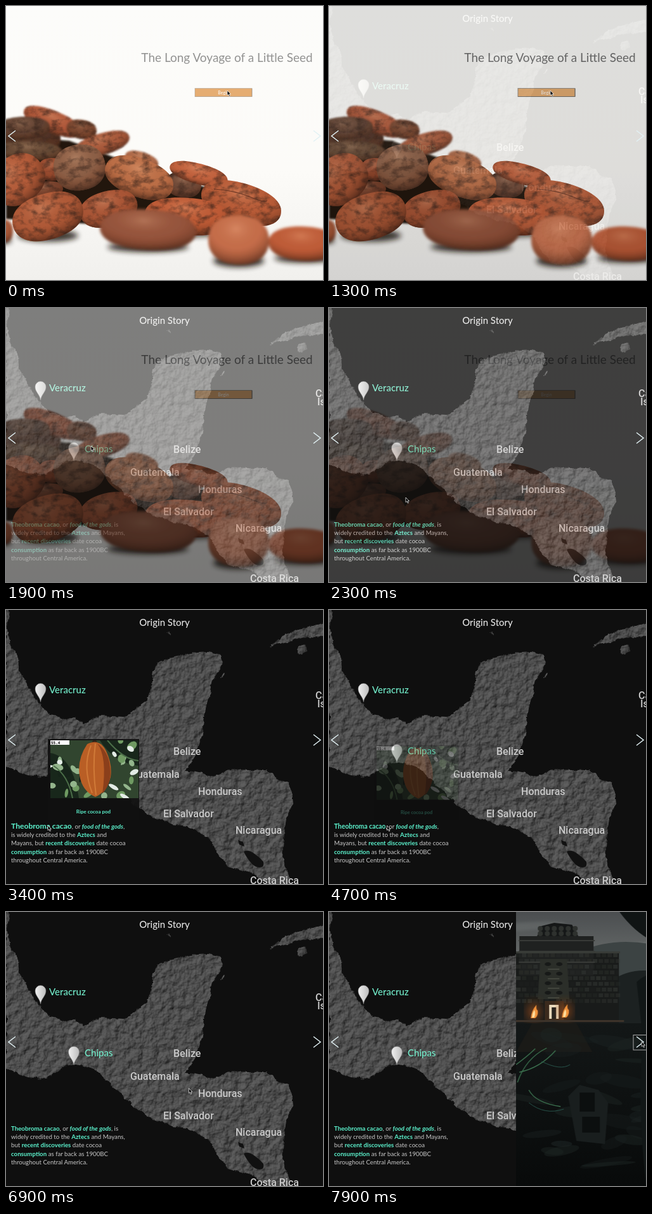
An HTML page for the animation above (8000 ms loop, 500x431 px).

```html
<!DOCTYPE html>
<html lang="en">
<head>
<meta charset="utf-8">
<title>Cacao story</title>
<style>
html, body { margin: 0; width: 100%; height: 100%; overflow: hidden; background: #0f0f0f; }
main { position: fixed; inset: 0; overflow: clip; contain: strict; }
main > svg { position: absolute; inset: 0; width: 100%; height: 100%; overflow: hidden; will-change: opacity; }
text { font-family: Lato, "Open Sans", sans-serif; white-space: pre; }
.land text { font: 500 16px Roboto, Arial, sans-serif; fill: #cacaca; }
.place { font-size: 15px; font-weight: 500; fill: #72ecca; }
.note { font-size: 9.7px; fill: #c9c9c9; }
.note .b { font-weight: 700; fill: #5cf2cd; }
.cap { font-size: 8px; font-weight: 700; fill: #5cf2cd; text-anchor: middle; }
</style>
</head>
<body>
<main id="stage"></main>
<script>
const LOOP = 8000, STEP = 100;
const $ = id => document.getElementById(id);
const clamp = v => Math.max(0, Math.min(1, v));
const ramp = (t, a, b) => clamp((t - a) / (b - a));
const smooth = p => p * p * (3 - 2 * p);
const easeInOut = p => p < .5 ? 4 * p ** 3 : 1 - 4 * (1 - p) ** 3;
const times = (n, f) => Array.from({ length: n }, (_, i) => f(i)).join('');

let seed = 11;
const rnd = (a, b) => {
  seed = (seed * 16807) % 2147483647;
  return +(a + (b - a) * seed / 2147483647).toFixed(1);
};

const layer = (id, body) => $('stage').insertAdjacentHTML('beforeend',
  `<svg id="${id}" viewBox="0 0 500 431">${body}</svg>`);
const rect = (x, y, w, h, fill, more = '') =>
  `<rect x="${x}" y="${y}" width="${w}" height="${h}" fill="${fill}" ${more}/>`;
const oval = (x, y, rx, ry, rot, fill, more = '') =>
  `<ellipse rx="${rx}" ry="${ry}" transform="translate(${x} ${y}) rotate(${rot})" fill="${fill}" ${more}/>`;
const path = (d, fill, more = '') => `<path d="${d}" fill="${fill}" ${more}/>`;
const line = (d, stroke, w, more = '') =>
  `<path d="${d}" fill="none" stroke="${stroke}" stroke-width="${w}" ${more}/>`;
const text = (x, y, s, more = '') => `<text x="${x}" y="${y}" ${more}>${s}</text>`;
const blur = (id, d) => `<filter id="${id}" x="-30%" y="-40%" width="160%" height="180%"><feGaussianBlur stdDeviation="${d}"/></filter>`;
const FULL = 'filterUnits="userSpaceOnUse" x="0" y="0" width="500" height="431" color-interpolation-filters="sRGB"';

// Map
const pin = (x, y) => path(`M${x} ${y}c-1-9-8.5-13-8.5-21a8.5 8.5 0 0 1 17 0c0 8-7.5 12-8.5 21z`,
  'url(#pinFill)', 'stroke="#777" stroke-width=".5"');
const coast = `M0 0H6L2 25 8 55 18 75 20 95 32 115 45 137 62 158 85 172 108 171 125 178 150 166 185 168
  205 155 222 143 228 125 232 98 240 82 262 75 290 68 320 66 340 70 343 82 336 98 325 110 322 128 316 150
  312 175 308 200 300 228 290 244 282 253 300 256 330 262 352 250 385 252 410 251 425 263 445 272 453 290
  452 305 442 330 438 360 436 390 445 415 450 436H420L390 415 368 408 350 403 335 387 325 365 310 352
  285 340 262 337 235 328 210 312 185 290 160 265 140 247 120 240 104 240 88 247 62 262 33 260 0 246Z`;
const isles = `M416 57L440 39 470 28 504 20V42L475 41 455 48 440 51ZM458 62l6-7 8 1 3 8-9 6-8-2z
  M338 108l4-9 3 1-4 8zM253 35q5-2 5 5l-3-3z`;

layer('map', `<defs>
  <linearGradient id="pinFill"><stop stop-color="#f0f0f0"/><stop offset="1" stop-color="#bdbdbd"/></linearGradient>
  <filter id="relief" ${FULL}>
    <feTurbulence type="fractalNoise" baseFrequency=".08" numOctaves="4" seed="7" result="n"/>
    <feDisplacementMap in="SourceGraphic" in2="n" scale="8" xChannelSelector="R" yChannelSelector="G" result="s"/>
    <feDiffuseLighting in="n" surfaceScale="3" lighting-color="#606060" result="l"><feDistantLight azimuth="225" elevation="55"/></feDiffuseLighting>
    <feComposite in="l" in2="s" operator="in"/>
  </filter></defs>
  ${rect(0, 0, 500, 431, '#0f0f0f')}
  <g filter="url(#relief)">${path(coast + isles, '#555')}</g>
  ${path('M375 380q6-4 15 2t16 14q2 9-6 9t-15-9-10-16zM366 362l8 3 2 7-8-3z', '#111')}
  <g class="land">
    ${text(264, 228, 'Belize')}${text(196, 264, 'Guatemala')}${text(303, 291, 'Honduras')}
    ${text(248, 326, 'El Salvador')}${text(362, 352, 'Nicaragua')}${text(385, 431, 'Costa Rica')}
    ${text(488, 140, 'Cayman')}${text(491, 153, 'Islands')}
  </g>
  ${pin(54.5, 145)}${pin(107, 241)}
  ${text(68, 130.5, 'Veracruz', 'class="place"')}${text(124, 227, 'Chipas', 'class="place"')}
  ${text(250, 24.5, 'Origin Story', 'font-size="15" font-weight="500" fill="#e2e2e2" text-anchor="middle"')}`);

// Note and picture cards
const strong = s => s.replace(/\*(.+?)\*/g, '<tspan class="b">$1</tspan>');
const lines = list => list.map((s, i) => text(8, 344 + i * 13.2, strong(s))).join('');
const tail = ['*consumption* as far back as 1900BC', 'throughout Central America.'];
const opening = (a, b, end) => `<tspan class="b" ${a}>Theobroma cacao</tspan>, or <tspan class="b" font-style="italic" ${b}>food of the gods</tspan>,${end}`;

const card = (id, x, label, art) => `<g id="${id}">
  ${rect(x - 4, 203, 144, 127, '#111', 'opacity=".93"')}
  <svg x="${x}" y="205" width="139" height="91" viewBox="0 0 139 91">${art}</svg>
  ${text(x + 68, 320, label, 'class="cap"')}</g>`;

const leaves = ['#e3ece6', '#6f9a62', '#16241a', '#93b58c'];
const podArt = rect(0, 0, 139, 91, '#31452f') +
  path('M0 20Q35 25 45 91H0zM78 0H139V40Q100 35 78 0z', '#18271b') +
  times(44, i => oval(rnd(0, 139), rnd(0, 91), rnd(3, 9), rnd(2, 6), rnd(0, 180), leaves[i % 4])) +
  line('M5 40Q28 55 35 91M90 0Q115 30 139 32', '#4b6e48', 2) +
  line('M72 0Q65 5 68 14', '#33251a', 6) +
  path('M58 6Q78-4 88 17T95 58Q88 82 71 89 50 80 46 55T58 6z', '#b95e25') +
  path('M74 5Q90 25 82 84 98 66 94 42 92 18 74 5z', '#8b3f1b') +
  line('M64 8Q50 42 66 83M71 5Q66 42 72 86', '#d07a38', 2) +
  rect(0, 0, 30, 7, '#fff') + text(1, 6, '55.4', 'font-size="6" font-weight="700" style="font-family:\'DejaVu Sans Mono\',monospace"');

const openArt = rect(0, 0, 139, 91, '#8b7257') +
  times(16, i => rect(i * 9, 0, rnd(2, 6), 91, ['#a68a69', '#6b543f', '#b29b7c'][i % 3])) +
  oval(62, 13, 42, 16, 4, '#2e1c15') + oval(62, 8, 32, 6, 4, '#4b3022') +
  oval(76, 60, 49, 31, -5, '#5c351a') + oval(73, 55, 48, 33, -6, '#c97a2c') + oval(73, 54, 44, 29, -6, '#e6b15c') +
  path('M22 50l10-7 2 16-8-2z', '#8a4b22') + oval(74, 52, 38, 22, -4, '#d8cebf') +
  times(8, i => oval(42 + i * 9, 42 + Math.abs(i - 3.5), 5, 10, 8, '#f3eee6') + oval(44 + i * 8.5, 61 - Math.abs(i - 3.5), 5, 10, -8, '#e8e1d6'));

layer('story', `<g class="note" id="plain">${lines([opening('', '', ' is'), 'widely credited to the *Aztecs* and Mayans,', 'but *recent discoveries* date cocoa', ...tail])}</g>
  <g class="note" id="wrapped">${lines([opening('id="word1"', 'id="word2"', ''), 'is widely credited to the *Aztecs* and', 'Mayans, but *recent discoveries* date cocoa', ...tail])}</g>
  ${card('card1', 70, 'Ripe cocoa pod', podArt)}${card('card2', 105, 'Open cocoa pod', openArt)}`);

// Beans: x, y, rx, ry, angle, colour. The outline is a little fuller than an ellipse.
const bean = ([x, y, rx, ry, a, c]) => {
  const h = rx * .62, v = ry * .62;
  const d = `M${-rx} 0C${-rx} ${-v} ${-h} ${-ry} 0 ${-ry}S${rx} ${-v} ${rx} 0 ${h} ${ry} 0 ${ry} ${-rx} ${v} ${-rx} 0z`;
  return `<g transform="translate(${x} ${y}) rotate(${a})">${path(d, c)}${path(d, 'url(#shade)')}</g>`;
};
const cast = ([x, y, rx, ry]) => oval(x, y + ry * .84, rx * .84, ry * .26, 0, '#1c1310');
const far = [[38, 210, 48, 26, 0, '#4a3024'], [74, 182, 49, 17, 22, '#b0583a'], [119, 194, 24, 15, 10, '#75452f'], [28, 192, 42, 18, -2, '#5a4032'],
  [38, 228, 51, 15, 2, '#5f4835'], [152, 217, 44, 17, -16, '#a85a3c'], [214, 242, 27, 12, 18, '#ae6b4a']];
const mid = [[72, 257, 22, 18, 0, '#96492e'], [62, 290, 28, 14, -8, '#74402c'], [116, 254, 41, 36, -8, '#8a6048'],
  [18, 273, 45, 38, -35, '#b45c3a'], [280, 281, 28, 20, 10, '#6a4838'], [304, 264, 47, 16, 15, '#c4633f'],
  [210, 270, 56, 30, 20, '#bd7048'], [371, 310, 65, 31, 17, '#b95c38'], [162, 319, 46, 28, -14, '#a95536'],
  [66, 331, 57, 36, -17, '#b05a38'], [288, 331, 69, 29, 5, '#bf5b36']];
const near = [[-3, 354, 14, 18, 0, '#a55637'], [224, 352, 76, 32, 3, '#94543d'], [470, 374, 56, 27, 3, '#c05c38'], [367, 368, 48, 39, 2, '#c76f4c']];

layer('beans', `<defs>${blur('b1', 1.5)}${blur('b2', 2)}${blur('b4', 4)}${blur('b8', 8)}
  <linearGradient id="table" x2="0" y2="1"><stop stop-color="#fcfcfa"/><stop offset=".6" stop-color="#fcfbf8"/><stop offset="1" stop-color="#f1f0ed"/></linearGradient>
  <radialGradient id="shade" cx=".45" cy=".28" r=".78"><stop stop-color="#ffc398" stop-opacity=".28"/><stop offset=".5" stop-color="#9a4a28" stop-opacity=".06"/><stop offset="1" stop-color="#1c0d08" stop-opacity=".72"/></radialGradient>
  <filter id="skin" ${FULL}>
    <feTurbulence type="fractalNoise" baseFrequency=".07 .1" numOctaves="5" seed="4"/>
    <feColorMatrix values="0 0 0 0 .2  0 0 0 0 .13  0 0 0 0 .1  1.6 0 0 0 -.7"/>
    <feComposite in2="SourceAlpha" operator="in" result="d"/>
    <feMerge><feMergeNode in="SourceGraphic"/><feMergeNode in="d"/></feMerge>
  </filter></defs>
  ${rect(0, 0, 500, 431, 'url(#table)')}
  <g filter="url(#b4)" opacity=".85">${[...near, ...mid.slice(-2)].map(cast).join('')}</g>
  ${path('M0 205L100 212 190 245 330 290 320 340 170 345 0 335z', '#21130e', 'filter="url(#b1)"')}
  <g filter="url(#skin)"><g filter="url(#b1)">${far.map(bean).join('')}</g>${mid.map(bean).join('')}
    ${line('M328 288Q360 290 384 300T412 306', '#6d3724', 1.2)}</g>
  <g filter="url(#b2)">${near.map(bean).join('')}</g>
  ${text(348.5, 87.5, 'The Long Voyage of a Little Seed', 'id="title" font-size="19" fill="#6f6f6f" text-anchor="middle"')}
  ${rect(298, 129.5, 90, 13, '#e5ad72')}
  <g id="edge">${rect(298, 129.5, 90, 13, 'none', 'stroke="#98928a"')}${line('M298 142.5H388V130', '#77716a', 1)}</g>
  ${text(343, 138.5, 'Begin', 'font-size="7" fill="#fff" text-anchor="middle"')}`);

// Temple scene, in its own slide space
const flame = (x, y) => oval(x, y, 10, 14, 0, '#a8521c', 'filter="url(#b8)" opacity=".7"') +
  path(`M${x - 5} ${y + 10}Q${x - 4} ${y - 2} ${x + 4} ${y - 11}q-1 8 2 9 1 8-4 12z`, '#f0913a') +
  path(`M${x - 3} ${y + 9}q1-9 4-12 2 8-1 12z`, '#ffe0a0');

layer('temple', `<defs><linearGradient id="sky" x2="0" y2="1"><stop stop-color="#4b4e50"/><stop offset=".5" stop-color="#666a69"/><stop offset="1" stop-color="#33393a"/></linearGradient>
  <linearGradient id="ground" x2="0" y2="1"><stop stop-color="#131717"/><stop offset="1" stop-color="#080a0a"/></linearGradient></defs>
  ${rect(0, 0, 500, 431, '#0c0f0f')}${rect(0, 0, 500, 150, 'url(#sky)')}
  ${times(9, () => oval(rnd(0, 500), rnd(5, 60), rnd(30, 70), rnd(3, 8), -4, '#7e8381', 'opacity=".3" filter="url(#b2)"'))}
  ${path('M100 62Q150 40 210 50T360 45 500 60V190H100z', '#3c4343')}${path('M150 108Q185 84 230 96T400 80 500 95V200H150z', '#1c2121')}
  ${path('M0 62H162V185H0z', '#191b1a')}${path('M5 38H122V100H5z', '#1f2120')}${path('M33 38L40 22 60 17 88 20 98 38z', '#151717')}
  ${times(12, i => oval(38 + i % 6 * 11, 34 - Math.floor(i / 6) * 8, 4, 4, 0, '#2e312e'))}
  ${times(9, r => times(18, c => rect(c * 9 + r % 2 * 4, 65 + r * 9, 7, 6, '#353834', `opacity="${rnd(.1, .6)}"`)))}
  ${times(3, r => rect(4, 44 + r * 17, 120, 2, '#383a37'))}
  ${rect(0, 62, 164, 3, '#383b37')}${path('M38 74H80L84 137H34z', '#2b2e29')}
  ${times(4, r => oval(50, 82 + r * 15, 5, 3, 0, '#171918') + oval(68, 82 + r * 15, 5, 3, 0, '#171918') + rect(50, 89 + r * 15, 18, 2, '#42453d'))}
  ${rect(45, 140, 30, 30, '#3b2a1d')}${rect(52, 146, 15, 22, '#e9d9bb')}${rect(56, 150, 7, 18, '#29231d')}
  ${flame(28, 157)}${flame(77, 156)}
  ${rect(0, 170, 170, 3, '#3d332a')}${rect(0, 175, 500, 256, 'url(#ground)')}
  ${path('M25 175H95L120 220H0z', '#1a1a17')}
  ${times(28, () => oval(rnd(0, 220), rnd(190, 400), rnd(15, 45), rnd(3, 12), rnd(-25, 25), '#1d2423', `opacity="${rnd(.2, .6)}"`))}
  ${path('M82 290L100 272 130 280 145 300 140 365 95 360z', '#191e1e')}${path('M100 284h24v30h-24zM104 322h28v25h-28z', '#0c0f0f')}
  ${line('M2 268Q15 230 48 214M5 252Q38 245 62 218M20 280Q30 300 70 306M0 240Q20 225 30 215', '#3d7551', 1.3)}
  ${line('M40 235Q70 250 85 240M20 300Q45 320 75 310', '#28534a', 1)}
  ${path('M163 0H500V50L300 42 215 46Q185 30 163 0z', '#101414')}${path('M190 110Q210 90 240 100V431H205Q190 300 200 200z', '#111616')}`);

// Controls
layer('controls', `${line('M15 196L4 204.5 15 213M485 196L496 204.5 485 213', '#e2f1f4', 1.5)}
  ${rect(480, 193.5, 24, 23.5, 'none', 'id="focus" stroke="#aaa"')}
  <g id="pointer">${path('M0 0V7.5L1.800 6 3.200 9 4.500 8.400 3.200 5.500H5.500z', '#000', 'stroke="#fff" stroke-width=".7"')}</g>`);

const set = (id, name, value) => $(id).setAttribute(name, value);
const show = (id, on) => set(id, 'visibility', on ? 'visible' : 'hidden');
const stops = [[0, 349, 133], [1500, 349, 133], [1900, 134, 217], [2000, 134, 217], [2300, 121, 298], [2400, 121, 298],
  [2900, 66, 339], [4500, 66, 339], [4900, 117, 339], [6500, 117, 339], [7350, 493, 204], [LOOP, 493, 204]];

function popUp(id, p, x) {
  set(id, 'opacity', p);
  set(id, 'transform', `translate(${x} 330) scale(${.9 + .1 * p}) translate(${-x} -330)`);
}

function draw(t) {
  const first = smooth(ramp(t, 2950, 3350)) - smooth(ramp(t, 4500, 4800));
  const second = smooth(ramp(t, 5000, 5400)) - smooth(ramp(t, 6400, 6700));
  const intro = ramp(t, 0, 600);
  $('beans').style.opacity = 1 - ramp(t, 1125, 2595);
  $('story').style.opacity = ramp(t, 1400, 2300);
  set('title', 'opacity', .74 + .26 * intro);
  set('edge', 'opacity', .45 + .55 * intro);
  popUp('card1', first, 138);
  popUp('card2', second, 173);
  const grown = first + second > .15;
  show('plain', !grown);
  show('wrapped', grown);
  set('word1', 'font-size', 9.7 * (1 + .25 * first));
  set('word2', 'font-size', 9.7 * (1 + .25 * second));
  $('temple').style.transform = `translateX(${100 * (1 - easeInOut(ramp(t, 7479, 8379)))}%)`;
  show('focus', t >= 7300);
  const i = stops.findIndex(s => s[0] > t);
  const [t0, x0, y0] = stops[i - 1], [t1, x1, y1] = stops[i];
  const p = smooth(ramp(t, t0, t1));
  set('pointer', 'transform', `translate(${x0 + (x1 - x0) * p} ${y0 + (y1 - y0) * p})`);
}

const start = performance.now();
function tick() {
  const t = (performance.now() - start) % LOOP;
  draw(Math.floor(t / STEP) * STEP);
  requestAnimationFrame(tick);
}
tick();
</script>
</body>
</html>
```
